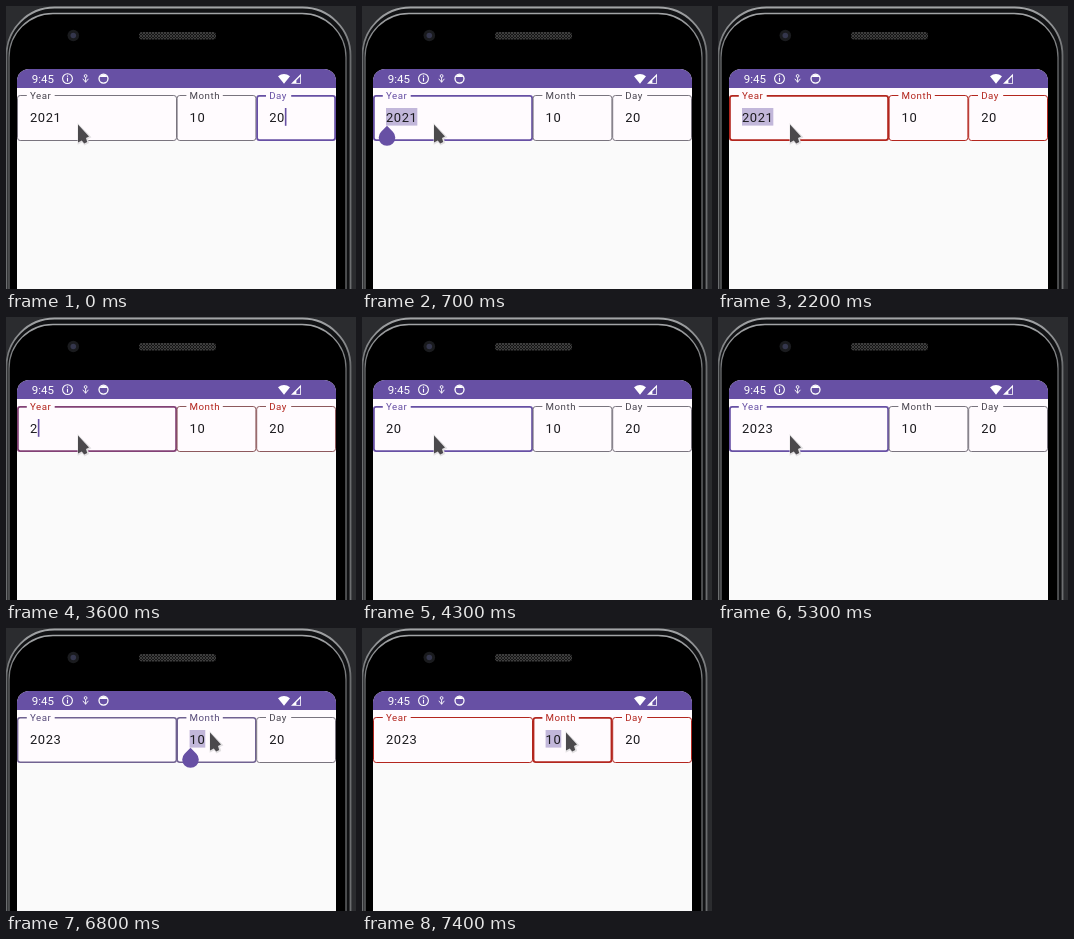
An HTML page for the animation above (8000 ms loop, 350 px wide and 283 px high).

```html
<!DOCTYPE html>
<html lang="en">
<head>
<meta charset="utf-8">
<title>Date fields</title>
<style>
  html, body { margin: 0; width: 100%; height: 100%; overflow: hidden; background: #2b2c2f; }
  svg { display: block; width: 350px; height: 283px; }
  text { font-family: Roboto, sans-serif; white-space: pre; }
  .label { font-size: 9.72px; letter-spacing: .5px; }
  .value { font-size: 12.96px; letter-spacing: .55px; fill: #1c1b1f; }
  .clock { font-size: 11.5px; fill: #fff; }
</style>
</head>
<body>
<svg viewBox="0 0 350 283">
  <defs>
    <pattern id="mesh" width="3" height="3" patternUnits="userSpaceOnUse">
      <rect width="3" height="3" fill="#161616"/>
      <path d="M0 0L3 3M3 0L0 3" stroke="#484848" stroke-width=".8"/>
    </pattern>
    <linearGradient id="rim" x1="0" y1="0" x2="0" y2="1">
      <stop offset="0" stop-color="#a2a4a6"/>
      <stop offset=".12" stop-color="#6c6e70"/>
    </linearGradient>
    <filter id="soft" x="-50%" y="-50%" width="200%" height="200%"><feGaussianBlur stdDeviation=".7"/></filter>
  </defs>

  <!-- phone body -->
  <rect x=".5" y="1.5" width="344" height="400" rx="48" fill="#111214" stroke="url(#rim)" stroke-width="1.8"/>
  <rect x="3" y="7.5" width="337" height="400" rx="44" fill="#000" stroke="url(#rim)" stroke-width="1.3"/>
  <circle cx="67.3" cy="29.5" r="5.8" fill="#1a1b1e"/>
  <circle cx="67.3" cy="29.5" r="2.8" fill="#34364c"/>
  <rect x="133" y="26" width="77" height="7.5" rx="3" fill="url(#mesh)"/>

  <!-- screen -->
  <path d="M11 283V75a12 12 0 0 1 12-12H318a12 12 0 0 1 12 12V283z" fill="#fafafa"/>
  <path d="M11 82V75a12 12 0 0 1 12-12H318a12 12 0 0 1 12 12V82z" fill="#6750a4"/>
  <rect x="11" y="82" width="319" height="53" fill="#fffbfe"/>

  <!-- status bar -->
  <text class="clock" x="25.7" y="76.8">9:45</text>
  <g fill="none" stroke="#fff" stroke-width="1.1">
    <circle cx="61.5" cy="72.6" r="4.9"/>
    <path d="M61.5 71.8V75.4M61.5 69.6V70.8"/>
    <circle cx="79.6" cy="70" r="1.4" stroke-width=".9"/>
    <path d="M79.6 71.4V76.4M76.8 72.8L79.6 76.2L82.4 72.8" stroke-width=".9"/>
    <circle cx="97.5" cy="72.6" r="4.5" stroke-width="1.3"/>
  </g>
  <path d="M93.4 70.9a4.6 4.6 0 0 1 8.2 0z" fill="#fff"/>
  <path d="M272 70.2Q278 65.8 284 70.2L278 77.8z" fill="#fff"/>
  <path d="M295 67.8V77.8H285z" fill="#fff"/>
  <path d="M294.2 70.4V77H290.4V74.2z" fill="#6750a4"/>

  <g id="form"></g>
  <path id="handle" d="M0 0L5.87 5.87A8.3 8.3 0 1 1 -5.87 5.87z" fill="#6750a4"/>
  <g id="mouse">
    <path d="M.6 .8L11.8 12.4L8.8 14L10 18L6.8 19.6L4.4 16.6L.6 18.6z" fill="#ddd" stroke="#e2e0e2" stroke-width="2" filter="url(#soft)"/>
    <path d="M0 0L11 11.8L8 13.4L9.2 17.4L6.2 19L3.8 16L0 18z" fill="#4b494c"/>
  </g>
</svg>
<script>
const LOOP = 8000, STEP = 100;
const TOP = 89, BOTTOM = 135, PAD = 13, ADVANCE = 7.83;
const OUTLINE = [121, 116, 126], MUTED = [73, 69, 79], PRIMARY = [103, 80, 164], ERROR = [179, 38, 30];

const el = (tag, attrs, parent) => {
  const node = document.createElementNS('http://www.w3.org/2000/svg', tag);
  set(node, attrs);
  parent.append(node);
  return node;
};
function set(node, attrs) {
  for (const k in attrs) node.setAttribute(k, attrs[k]);
}
const show = (node, on) => { node.style.display = on ? '' : 'none'; };
const mix = (a, b, p) => a.map((v, i) => v + (b[i] - v) * p);
const rgb = c => `rgb(${c.map(Math.round)})`;
const ramp = (t, start, span = 200) => {
  const p = Math.min(1, Math.max(0, (t - start) / span));
  return p * p * (3 - 2 * p);
};
const within = (t, ...spans) => spans.some(([a, b]) => t >= a && t < b);
// Last row whose start time has passed
const at = (rows, t) => rows.filter(r => r[0] <= t).pop()[1];

const form = document.getElementById('form');
const handle = document.getElementById('handle');
const mouse = document.getElementById('mouse');

const makeField = (name, left, right, labelWidth) => {
  const x = left + PAD;
  const mark = el('rect', { x, y: 102, height: 17.6, fill: 'rgb(103,80,164)', 'fill-opacity': .4 }, form);
  const border = el('path', { fill: 'none' }, form);
  const label = el('text', { class: 'label', x, y: 93 }, form);
  label.textContent = name;
  const value = el('text', { class: 'value', x, y: 116.3 }, form);
  const caret = el('rect', { y: 102, width: 1.6, height: 17.8, fill: '#6750a4' }, form);
  return { left, right, x, labelWidth, mark, border, label, value, caret };
};

const year = makeField('Year', 11, 171, 21.5);
const month = makeField('Month', 170.6, 250.4, 30);
const day = makeField('Day', 250.2, 330, 18.8);

function outline(f, w) {
  const l = f.left + w / 2, r = f.right - w / 2, t = TOP + w / 2, b = BOTTOM - w / 2, k = 3.2 - w / 2;
  const arc = (x, y) => `A${k} ${k} 0 0 1 ${x} ${y}`;
  return `M${f.x + f.labelWidth + 3.2} ${t}H${r - k}${arc(r, t + k)}V${b - k}${arc(r - k, b)}` +
    `H${l + k}${arc(l, b - k)}V${t + k}${arc(l + k, t)}H${f.x - 3.2}`;
}

function draw(f, { text, focus, error, labelError, selected, caret }) {
  const w = 1 + .8 * focus;
  set(f.border, {
    d: outline(f, w),
    'stroke-width': w,
    stroke: rgb(mix(mix(OUTLINE, PRIMARY, focus), ERROR, error))
  });
  set(f.label, { fill: rgb(mix(mix(MUTED, PRIMARY, focus), ERROR, labelError)) });
  f.value.textContent = text;
  const length = text.length * ADVANCE;
  set(f.mark, { width: length });
  set(f.caret, { x: f.x + length });
  show(f.mark, selected);
  show(f.caret, caret);
}

const typed = [[0, '2021'], [3600, '2'], [3800, '20'], [4500, '202'], [4700, '2023']];

function render(t) {
  const error = ramp(t, 2000) - ramp(t, 3480) + ramp(t, 7200);
  const labelError = ramp(t, 2000) - ramp(t, 3600) + ramp(t, 7200);
  const common = { error, labelError, selected: false, caret: false };

  draw(year, {
    ...common,
    text: at(typed, t),
    focus: ramp(t, 500) - ramp(t, 6700),
    selected: within(t, [500, 3600]),
    caret: within(t, [3600, 4300], [4500, 5300], [5800, 6200])
  });
  draw(month, { ...common, text: '10', focus: ramp(t, 6700), selected: t >= 6700 });
  draw(day, { ...common, text: '20', focus: 1 - ramp(t, 500), caret: t < 100 });

  show(handle, within(t, [500, 2000], [6700, 7200]));
  set(handle, { transform: `translate(${t < 6700 ? 25 : 184.5} 119.8)` });

  const p = ramp(t, 5700, 500);
  const y = 118.6 - 14 * p - 16 * Math.sin(Math.PI * p);
  set(mouse, { transform: `translate(${72 + 132 * p} ${y})` });
}

const start = performance.now();
function tick() {
  const t = (performance.now() - start) % LOOP;
  render(Math.floor(t / STEP) * STEP);
  requestAnimationFrame(tick);
}
tick();
</script>
</body>
</html>
```
